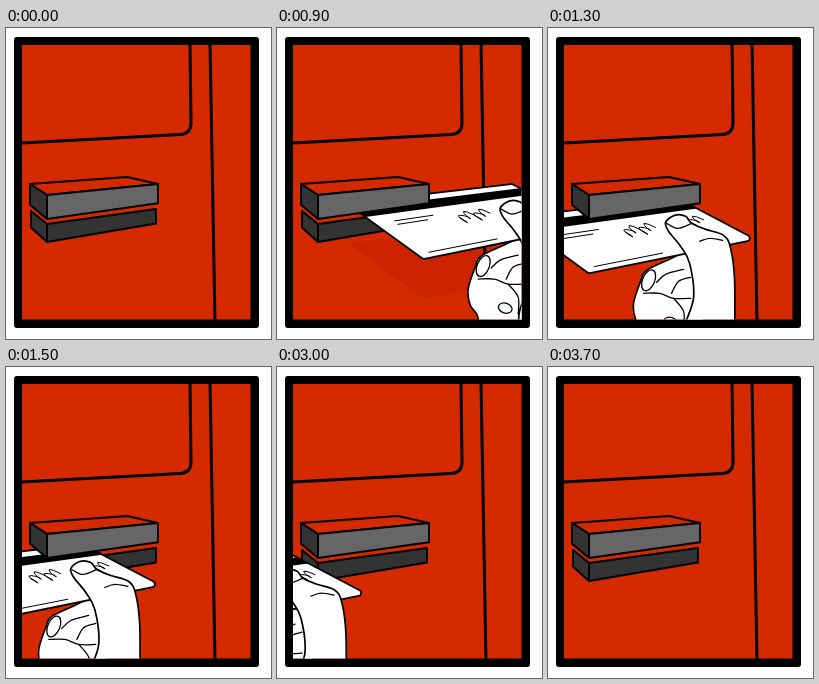
Animation of 265 by 311 pixels, one loop 3.8 s. Source, as an HTML page with a canvas:

```html
<!DOCTYPE html>
<html lang="en">
<head>
<meta charset="utf-8">
<title>Card swipe</title>
<style>
  html, body { margin: 0; width: 100%; height: 100%; overflow: hidden; background: #fff; }
  canvas { display: block; width: 265px; height: 311px; }
</style>
</head>
<body>
<canvas id="stage" width="265" height="311"></canvas>
<script>
const ctx = document.getElementById('stage').getContext('2d');
const LOOP = 3800, STEP = 100;
const ENTER = 700, SHADOW_END = 1300, REST = 1700, LEAVE = 3000, GONE = 3600;
const SWIPE_SPEED = 0.264, EXIT_SPEED = 0.12, TILT = -0.135;
const RED = '#d52900', SHADE = '#cd2300', DARK = '#333', GREY = '#666';

const CARD = [[18, 182], [184, 163], [262, 204], [95, 238]];

const mix = (a, b, p) => a + (b - a) * p;
const mixPoint = (a, b, p) => [mix(a[0], b[0], p), mix(a[1], b[1], p)];

// Point on the card: u runs along the slot, v towards the viewer.
function onCard(u, v) {
  const [tl, tr, br, bl] = CARD;
  return mixPoint(mixPoint(tl, bl, v), mixPoint(tr, br, v), u);
}

function line(points) {
  const path = new Path2D();
  points.forEach(p => path.lineTo(...p));
  return path;
}

// Smooth curve through all given points.
function curve(points) {
  const path = new Path2D();
  const at = i => points[Math.max(0, Math.min(points.length - 1, i))];
  path.moveTo(...points[0]);
  for (let i = 0; i < points.length - 1; i++) {
    const [a, b, c, d] = [at(i - 1), at(i), at(i + 1), at(i + 2)];
    path.bezierCurveTo(
      b[0] + (c[0] - a[0]) / 6, b[1] + (c[1] - a[1]) / 6,
      c[0] - (d[0] - b[0]) / 6, c[1] - (d[1] - b[1]) / 6, ...c);
  }
  return path;
}

function oval(x, y, rx, ry, turn) {
  const path = new Path2D();
  path.ellipse(x, y, rx, ry, turn, 0, Math.PI * 2);
  return path;
}

function roundedCard(radius) {
  const path = new Path2D();
  path.moveTo(...mixPoint(CARD[0], CARD[1], 0.5));
  for (let i = 1; i <= 4; i++) path.arcTo(...CARD[i % 4], ...CARD[(i + 1) % 4], radius);
  path.closePath();
  return path;
}

// Illegible handwriting between two places on the card.
function scribble(from, to, loops) {
  const points = [], count = loops * 8;
  for (let i = 0; i <= count; i++) {
    const a = i / count * loops * Math.PI * 2;
    const height = 0.07 + 0.04 * Math.cos(a / 2);
    points.push(onCard(mix(from, to, i / count) + 0.012 * Math.cos(a), 0.48 + height * Math.sin(a)));
  }
  return line(points);
}

const cardShape = roundedCard(3);
const stripe = line([onCard(0, 0.1), onCard(1, 0.1), onCard(1, 0.25), onCard(0, 0.25)]);
const print = [
  line([onCard(0.12, 0.37), onCard(0.35, 0.37)]),
  line([onCard(0.11, 0.43), onCard(0.29, 0.43)]),
  line([onCard(0.07, 0.92), onCard(0.48, 0.92)]),
  scribble(0.45, 0.63, 4),
  scribble(0.84, 0.92, 2)
];

const fist = curve([
  [198, 212], [180, 222], [153, 235], [147, 246], [140, 268], [142, 284], [149, 294], [160, 320], [215, 320]
]);
const fingers = [
  oval(155, 245, 6, 11, 0.4),
  oval(177, 287, 7, 5, 0.3),
  curve([[163, 247], [172, 239], [190, 234]]),
  curve([[150, 258], [166, 258], [180, 263], [197, 263]]),
  curve([[178, 258], [185, 246], [197, 242]]),
  curve([[180, 263], [190, 276], [190, 293]])
];
const hand = curve([
  [191, 320], [191, 292], [200, 262], [196, 228], [187, 211], [175, 196], [172, 187], [181, 180],
  [192, 181], [198, 188], [212, 194], [230, 200], [237, 213], [241, 245], [241, 320]
]);
const creases = [
  curve([[173, 188], [184, 193], [198, 188]]),
  curve([[206, 206], [216, 203], [229, 205]])
];

function stroke(shape, width) {
  ctx.lineWidth = width;
  ctx.stroke(shape);
}

function paint(shape, fill, width) {
  ctx.fillStyle = fill;
  ctx.fill(shape);
  stroke(shape, width);
}

function offsetAt(t) {
  if (t < ENTER || t >= GONE) return null;
  const swiped = Math.min(t, REST) - ENTER;
  const left = Math.max(0, t - LEAVE + STEP);
  const x = 104 - swiped * SWIPE_SPEED - left * EXIT_SPEED;
  return [x, x * TILT];
}

function shifted([x, y], draw) {
  ctx.save();
  ctx.translate(x, y);
  draw();
  ctx.restore();
}

function drawShadow() {
  ctx.fillStyle = SHADE;
  ctx.fill(cardShape);
}

// Front and left side, hanging from the corner edge.
function drawBlock(left, corner, right, height, front) {
  const face = (a, b, ha, hb) =>
    line([a, b, [b[0], b[1] + hb], [a[0], a[1] + ha], a]);
  paint(face(left, corner, height * 0.7 + 4, height), DARK, 2);
  paint(face(corner, right, height, height * 0.8), front, 2);
}

function drawUpperBlock() {
  const left = [24, 156], corner = [41, 167], right = [152, 156];
  paint(line([left, [121, 149], right, corner, left]), RED, 2);
  drawBlock(left, corner, right, 24, GREY);
}

function drawCard() {
  paint(fist, '#fff', 1.6);
  fingers.forEach(f => stroke(f, 1.3));
  paint(cardShape, '#fff', 1.8);
  ctx.fillStyle = '#000';
  ctx.fill(stripe);
  print.forEach(p => stroke(p, 1));
  paint(hand, '#fff', 1.7);
  creases.forEach(c => stroke(c, 1.3));
}

function drawPanel() {
  const path = new Path2D();
  path.moveTo(14, 115.2);
  path.lineTo(174, 106.6);
  path.quadraticCurveTo(185, 106, 185, 95);
  path.lineTo(184, 15);
  stroke(path, 3);
}

function draw(t) {
  const pos = offsetAt(t);
  ctx.fillStyle = '#fff';
  ctx.fillRect(0, 0, 265, 311);
  ctx.strokeStyle = '#000';
  ctx.lineJoin = ctx.lineCap = 'round';

  ctx.fillStyle = '#000';
  ctx.beginPath();
  ctx.roundRect(8, 9, 245, 291, 3);
  ctx.fill();

  ctx.save();
  ctx.beginPath();
  ctx.rect(16, 17, 228.5, 274.5);
  ctx.clip();
  ctx.fillStyle = RED;
  ctx.fillRect(0, 0, 265, 311);
  if (pos && t < SHADOW_END) shifted([pos[0] + 1, pos[1] + 40], drawShadow);
  drawPanel();
  stroke(line([[204, 15], [209, 294]]), 3);
  drawBlock([25, 183], [41, 196], [150, 181], 18, DARK);
  if (pos) shifted(pos, drawCard);
  drawUpperBlock();
  ctx.restore();
}

const start = performance.now();
function tick() {
  const t = (performance.now() - start) % LOOP;
  draw(Math.floor(t / STEP) * STEP);
  requestAnimationFrame(tick);
}
tick();
</script>
</body>
</html>
```
